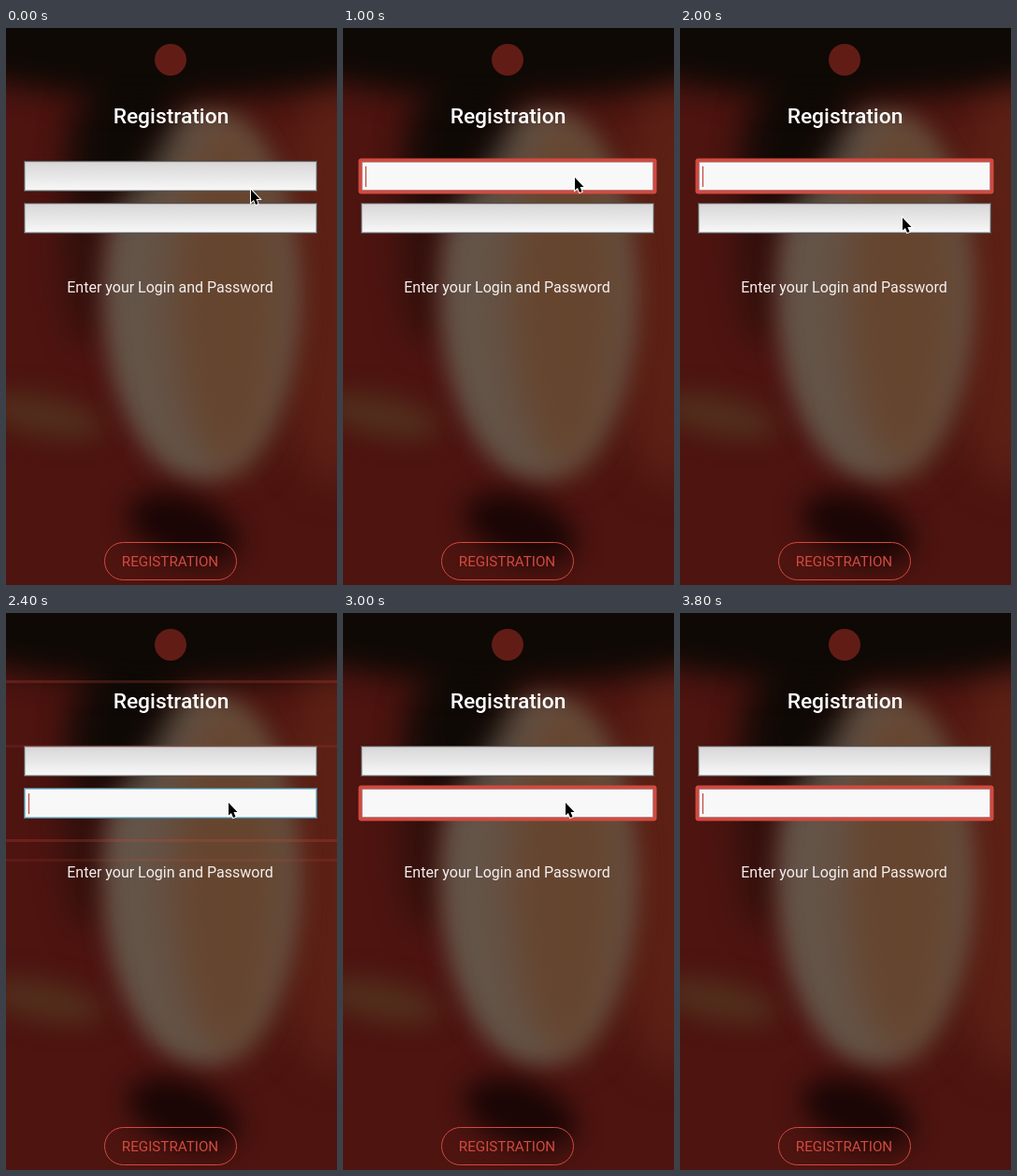
Recreate the animation shown at these times as an HTML page with a canvas. Size 354 px wide and 596 px high, loop 3.9 s.

```html
<!DOCTYPE html>
<html lang="en">
<head>
<meta charset="utf-8">
<title>Registration form</title>
<style>
  html, body { margin: 0; width: 100%; height: 100%; overflow: hidden; background: #180807; }
  canvas { display: block; }
</style>
</head>
<body>
<canvas id="stage" width="354" height="596"></canvas>
<script>
const W = 354, H = 596, LOOP = 3900, STEP = 100;
const ctx = document.getElementById('stage').getContext('2d');
const RED = '#d14a40';
const FIELD = { x: 20, w: 312, h: 31 };
const FADE = 285, SPREAD = 112, BLINK = 530;
const fields = [
  { y: 143, focus: 700, blur: 2300 },
  { y: 188, focus: 2300, blur: Infinity },
];
const arrow = new Path2D('M0 0V13.5L3 11L5 16L7.5 15L5.5 10H9.5Z');

const clamp01 = v => Math.max(0, Math.min(1, v));

// CSS "ease": cubic-bezier(.25, .1, .25, 1)
function ease(x) {
  const bezier = (a, b, u) => 3 * a * u * (1 - u) ** 2 + 3 * b * u * u * (1 - u) + u ** 3;
  let lo = 0, hi = 1;
  for (let i = 0; i < 24; i++) {
    const mid = (lo + hi) / 2;
    if (bezier(0.25, 0.25, mid) < x) lo = mid; else hi = mid;
  }
  return bezier(0.1, 1, lo);
}
const progress = (t, from, duration) => ease(clamp01((t - from) / duration));

// Out-of-focus photograph: a few blurred ellipses over dark red
function makeBackdrop() {
  const c = document.createElement('canvas');
  c.width = W;
  c.height = H;
  const g = c.getContext('2d');
  const glow = (color, blur, x, y, rx, ry, tilt = 0) => {
    g.filter = `blur(${blur}px)`;
    g.fillStyle = color;
    g.beginPath();
    g.ellipse(x, y, rx, ry, tilt, 0, 2 * Math.PI);
    g.fill();
  };
  g.fillStyle = '#4d1410';
  g.fillRect(0, 0, W, H);
  glow('#5c2015', 20, 350, 270, 65, 220);
  glow('#32100c', 16, 85, 210, 25, 130);
  glow('#52301d', 14, 40, 415, 65, 20, 0.2);
  glow('#645448', 12, 208, 285, 104, 199);
  glow('#66452f', 20, 238, 285, 60, 190);
  glow('#0e0905', 18, 130, 95, 48, 100, 0.35);
  glow('#0e0905', 16, W / 2, -30, 330, 105);
  glow('#1a0605', 14, 190, 535, 62, 34, 0.35);
  return c;
}
const backdrop = makeBackdrop();

function text(str, x, y, font, color) {
  ctx.font = `${font} Roboto, sans-serif`;
  ctx.textAlign = 'center';
  ctx.fillStyle = color;
  ctx.fillText(str, x, y);
}

function drawField({ y, focus, blur }, t) {
  const { x, w, h } = FIELD;
  const focused = t > focus && t < blur;
  const shade = ctx.createLinearGradient(0, y, 0, y + h);
  shade.addColorStop(0, focused ? '#f8f8f8' : '#d8d6d6');
  shade.addColorStop(1, '#f8f8f8');
  ctx.fillStyle = shade;
  ctx.fillRect(x, y, w, h);

  ctx.lineWidth = 1;
  ctx.strokeStyle = focused ? '#4f7c8e' : '#55504f';
  ctx.strokeRect(x - 0.5, y - 0.5, w + 1, h + 1);
  ctx.strokeStyle = focused ? '#9cc4d4' : '#b9b8b8';
  ctx.strokeRect(x + 0.5, y + 0.5, w - 1, h - 1);

  if (focused && (t - focus) % (2 * BLINK) < BLINK) {
    ctx.fillStyle = '#b8352d';
    ctx.fillRect(x + 4, y + 5, 1, 22);
  }
}

// The focus ring shrinks onto its field and spreads away again on blur
function drawRing({ y, focus, blur }, t) {
  const { x, w, h } = FIELD;
  const leaving = t >= blur;
  const e = progress(t, leaving ? blur : focus, FADE);
  const grow = SPREAD * (leaving ? e : 1 - e) + 1.5;
  ctx.globalAlpha = leaving ? 0.6 * (1 - e) : e ** 4;
  ctx.strokeStyle = RED;
  ctx.lineWidth = 3 + clamp01(1 - grow / 30);
  ctx.beginPath();
  ctx.roundRect(x - grow, y - grow, w + 2 * grow, h + 2 * grow, 1);
  ctx.stroke();
  ctx.globalAlpha = 1;
}

function drawCursor(t) {
  if (t >= 3400) return;
  const toFirst = progress(t, 0, 500), toSecond = progress(t, 1400, 500);
  ctx.save();
  ctx.translate(
    Math.round(262 - 14 * toFirst - 10 * toSecond),
    Math.round(173 - 13 * toFirst + 43 * toSecond));
  ctx.lineWidth = 2;
  ctx.strokeStyle = '#fff';
  ctx.stroke(arrow);
  ctx.fillStyle = '#000';
  ctx.fill(arrow);
  ctx.restore();
}

function draw(t) {
  ctx.drawImage(backdrop, 0, 0);
  ctx.fillStyle = '#621c16';
  ctx.beginPath();
  ctx.arc(176, 34, 17, 0, 2 * Math.PI);
  ctx.fill();

  fields.forEach(f => drawField(f, t));
  fields.forEach(f => drawRing(f, t));

  text('Registration', 176.5, 102, '500 22.8px', '#fff');
  text('Enter your Login and Password', 175.5, 283, '400 16px', '#f4efed');
  text('REGISTRATION', 175.5, 576, '400 15.2px', RED);
  ctx.strokeStyle = RED;
  ctx.lineWidth = 1;
  ctx.beginPath();
  ctx.roundRect(105.5, 550.5, 141, 40, 20);
  ctx.stroke();
  drawCursor(t);
}

const start = performance.now();
function tick() {
  const t = (performance.now() - start) % LOOP;
  draw(Math.floor(t / STEP) * STEP);
  requestAnimationFrame(tick);
}
tick();
</script>
</body>
</html>
```
